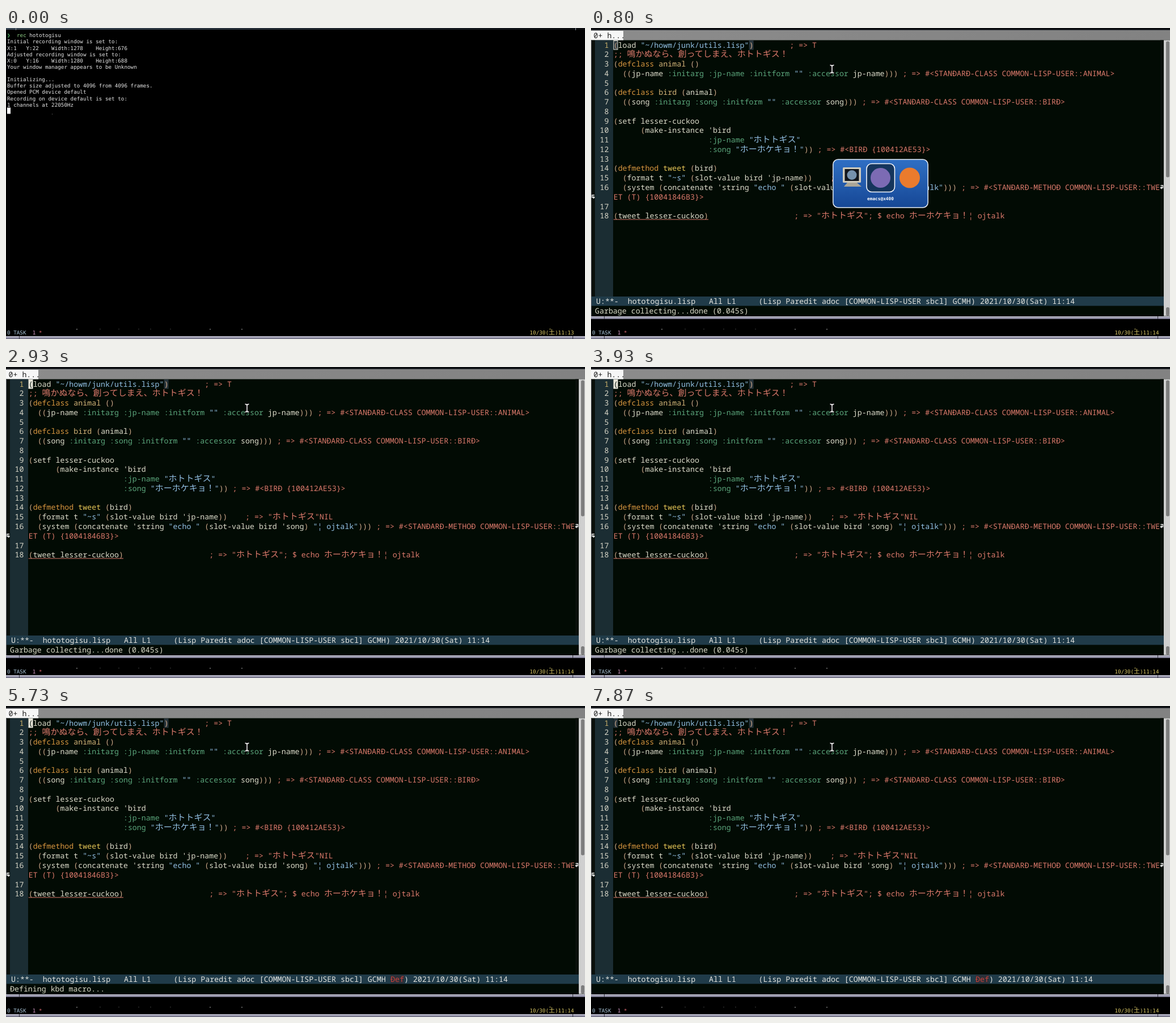
Write an HTML page that moves like this. It is 1021 by 549 pixels and loops after 8 s.

```html
<!DOCTYPE html>
<html lang="en">
<head>
<meta charset="utf-8">
<title>Lisp session</title>
<style>
  html, body { margin: 0; width: 100%; height: 100%; overflow: hidden; background: #000; }
  svg { display: block; width: 1021px; height: 549px; }
  text { white-space: pre; text-rendering: geometricPrecision; }
  .term { font: 9.277px "DejaVu Sans Mono", monospace; }
  .edit { font: 13.275px "Noto Sans Mono", monospace; }
  .term.wide { font: 11px "Noto Sans CJK JP", "Noto Sans CJK", sans-serif; }
  .edit.wide { font: 15px "Noto Sans CJK JP", "Noto Sans CJK", sans-serif; }
</style>
</head>
<body>
<svg id="stage" viewBox="0 0 1021 549">
  <defs>
    <linearGradient id="sky" x1="0" y1="0" x2="0" y2="1">
      <stop offset="0" stop-color="#2f6fc4"/>
      <stop offset="1" stop-color="#164795"/>
    </linearGradient>
    <linearGradient id="strip">
      <stop offset="0" stop-color="#3a4754"/>
      <stop offset="1" stop-color="#0c0e11"/>
    </linearGradient>
    <linearGradient id="bar">
      <stop offset="0" stop-color="#8c8c8c"/>
      <stop offset="1" stop-color="#828282"/>
    </linearGradient>
  </defs>
</svg>
<script>
const NS = 'http://www.w3.org/2000/svg';
const stage = document.getElementById('stage');
const LOOP = 8000;
const INK = '#dedccb', SALMON = '#dd7a6c', GREEN = '#5ba57b', STRING = '#93c0e4';
const ORANGE = '#d9963f', PAREN = '#cfa98a', BACK = '#020b04';
const FONTS = { term: { half: 5.585, full: 11 }, edit: { half: 7.965, full: 15 } };
const WIDE = /([\u3000-\u9fff\uff00-\uffef]+)/;

function add(tag, attrs, parent = stage) {
  const el = document.createElementNS(NS, tag);
  for (const key in attrs) el.setAttribute(key, attrs[key]);
  parent.append(el);
  return el;
}
const group = (parent = stage) => add('g', {}, parent);
const rect = (x, y, width, height, fill, parent, extra = {}) =>
  add('rect', { x, y, width, height, fill, ...extra }, parent);

// Draws one coloured run on the character grid and returns its right end.
function write(x, y, str, fill, font, parent) {
  const { half, full } = FONTS[font];
  for (const part of str.split(WIDE)) {
    const wide = WIDE.test(part);
    if (part.trim()) {
      const lead = part.length - part.trimStart().length;
      add('text', { x: x + lead * half, y, fill, class: font + (wide ? ' wide' : '') }, parent)
        .textContent = part.trim();
    }
    x += part.length * (wide ? full : half);
  }
  return x;
}

const TOKEN = /"[^"]*"|;.*$|:[a-z-]+|\bdef\w+|[()]+|\s+|[^\s()":;]+/g;
function colour(token, prev) {
  if (token[0] === '"') return STRING;
  if (token[0] === ';') return SALMON;
  if (token[0] === ':') return GREEN;
  if (/^def/.test(token)) return ORANGE;
  if (/^[()]/.test(token)) return PAREN;
  if (prev === 'defclass') return '#d2b277';
  if (prev === 'defmethod') return '#e6c657';
  return INK;
}
function highlight(x, y, line, parent) {
  let prev = '';
  for (const token of line.match(TOKEN) || []) {
    x = write(x, y, token, colour(token, prev), 'edit', parent);
    if (token.trim()) prev = token;
  }
}

function border(y, parent) {
  rect(0, y, 1021, 5, '#9a99ad', parent);
  rect(0, y, 1021, 1, '#d0cfde', parent);
  rect(0, y + 4, 1021, 1, '#56566a', parent);
  for (const x of [23, 999]) rect(x, y, 1, 5, '#33333d', parent);
}

// Terminal
rect(0, 0, 1021, 549, '#000');
rect(0, 0, 1021, 3, 'url(#strip)');
for (const x of [17, 1004]) rect(x, 0, 1, 4, '#8a939c');
const term = group();
const row = n => 16.3 + n * 11.13;
write(2, row(0), '❯', '#58c46a', 'term', term);
write(19, row(0), 'rec', '#8fce86', 'term', term);
write(41.2, row(0), 'hototogisu', '#e6e6e6', 'term', term);
[
  'Initial recording window is set to:',
  'X:1   Y:22    Width:1278    Height:676',
  'Adjusted recording window is set to:',
  'X:0   Y:16    Width:1280    Height:688',
  'Your window manager appears to be Unknown',
  '',
  'Initializing...',
  'Buffer size adjusted to 4096 from 4096 frames.',
  'Opened PCM device default',
  'Recording on device default is set to:',
  '1 channels at 22050Hz'
].forEach((line, i) => write(2, row(i + 1), line, '#e6e6e6', 'term', term));
const capturing = group(term);
write(2, row(12), 'Capturing!', '#e6e6e6', 'term', capturing);
const block = rect(2, 140.5, 6, 11, '#fff', term);
rect(81, 151, 1, 2, '#444', term);

// Terminal status line
for (const x of [125, 360, 416]) rect(x - 1, 531, 2, 1.5, '#777');
for (const x of [166, 199, 234, 255, 290]) rect(x - 1, 531, 2, 1, '#3a3a3a');
rect(958, 531, 3, 1, '#a89c50');
write(2, 541.3, '0 TASK', '#a9c5d8', 'term');
write(46.7, 541.3, '1', '#d59ac8', 'term');
write(57.9, 541.3, '*', '#e06c75', 'term');
const clocks = ['11:13', '11:14'].map(time => {
  const g = group();
  write(923.5, 541.3, `10/30(土)${time}`, '#d9c765', 'term', g);
  return g;
});
border(544);

// Editor window
const editor = group();
rect(0, 0, 1021, 514, BACK, editor);
rect(0, 0, 1021, 4, '#0a0c0f', editor);
rect(0, 3, 1021, 1, '#34383e', editor);
rect(0, 4, 1021, 17.5, 'url(#bar)', editor);
rect(0, 5, 57, 16.5, '#f6f6f6', editor);
write(4.5, 18, '0+ h...', '#222', 'edit', editor);
rect(0, 21.5, 7, 469, '#0a0f0b', editor);
rect(7, 21.5, 32, 452.5, '#1b2d33', editor);
rect(1004, 21.5, 6, 452.5, '#0a0f0b', editor);
rect(1010, 21.5, 11, 487, '#cfcfcf', editor);
rect(1014, 23.5, 6, 240, '#7d7d7d', editor, { rx: 2.5 });
rect(1014, 493, 6, 15, '#7d7d7d', editor, { rx: 2.5 });
rect(0, 21.5, 1, 488, '#66666f', editor);

const code = [
  '(load "~/howm/junk/utils.lisp")        ; => T',
  ';; 鳴かぬなら、創ってしまえ、ホトトギス！',
  '(defclass animal ()',
  '  ((jp-name :initarg :jp-name :initform "" :accessor jp-name))) ; => #<STANÐARÐ-CLASS COMMON-LISP-USER::ANIMAL>',
  '',
  '(defclass bird (animal)',
  '  ((song :initarg :song :initform "" :accessor song))) ; => #<STANÐARÐ-CLASS COMMON-LISP-USER::BIRÐ>',
  '',
  '(setf lesser-cuckoo',
  "      (make-instance 'bird",
  '                     :jp-name "ホトトギス"',
  '                     :song "ホーホケキョ！")) ; => #<BIRÐ {100412AE53}>',
  '',
  '(defmethod tweet (bird)',
  '  (format t "~s" (slot-value bird \'jp-name))    ; => "ホトトギス"NIL',
  '  (system (concatenate \'string "echo " (slot-value bird \'song) "¦ ojtalk"))) ; => #<STANÐARÐ-METHOÐ COMMON-LISP-USER::TWE',
  null,
  '',
  '(tweet lesser-cuckoo)                   ; => "ホトトギス"; $ echo ホーホケキョ！¦ ojtalk'
];
const lineY = i => 34.6 + i * 16.76;
const LEFT = 39.7;

for (const x of [39.5, 278.6]) rect(x, 22, 8, 16.5, '#26333a', editor);
let number = 0;
code.forEach((line, i) => {
  if (line === null) {
    write(LEFT, lineY(i), 'ET (T) {10041846B3}>', SALMON, 'edit', editor);
    return;
  }
  const label = String(++number).padStart(2);
  write(15.6, lineY(i), label, number === 1 ? '#c9b06a' : '#d9d7c8', 'edit', editor);
  highlight(LEFT, lineY(i), line, editor);
});
rect(LEFT, 337.5, 167.3, 1, SALMON, editor);

// Wrap marks in the fringes
const mark = (x, y, flip) => add('path', {
  d: 'M-2.5 -2.5H1.5V1.5H-2M-.5 -.5L-2.5 1.5L-.5 3.5', fill: 'none', stroke: '#eee',
  'stroke-width': 1.4, transform: `translate(${x} ${y}) scale(${flip} 1)`
}, editor);
mark(1007, 280.5, 1);
mark(3.5, 297.5, -1);

// Mode line and echo area
rect(1, 474, 1009, 16.5, '#203b49', editor);
const MODE_Y = 486.8;
const modeCol = n => 9 + n * FONTS.edit.half;
write(9, MODE_Y, 'U:**-  hototogisu.lisp   All L1     (Lisp Paredit adoc [COMMON-LISP-USER sbcl] GCMH',
  '#e2e4df', 'edit', editor);
const STAMP = ') 2021/10/30(Sat) 11:14';
const plainMode = group(editor), macroMode = group(editor);
write(modeCol(83), MODE_Y, STAMP, '#e2e4df', 'edit', plainMode);
rect(modeCol(84), 475, 24, 14.5, '#2b3038', macroMode);
write(modeCol(84), MODE_Y, 'Ðef', '#c8423c', 'edit', macroMode);
write(modeCol(87), MODE_Y, STAMP, '#e2e4df', 'edit', macroMode);
const [collected, defining] = ['Garbage collecting...done (0.045s)', 'Ðefining kbd macro...'].map(msg => {
  const g = group(editor);
  write(7, 503.6, msg, INK, 'edit', g);
  return g;
});
border(509, editor);

// Text cursor in its three looks, then the mouse pointer
const hollow = rect(40, 22.5, 7, 15.5, 'none', editor, { stroke: '#e8e6da' });
const solid = group(editor);
rect(39.5, 22, 8, 16.5, '#e8e6da', solid);
write(LEFT, lineY(0), '(', '#14201a', 'edit', solid);
const tail = rect(286.6, 22, 8, 16.5, '#e8e6da', editor);
const beam = 'M421.5 65.5Q425 65.5 425 68Q425 65.5 428.5 65.5M425 67V78M421.5 79.5Q425 79.5 425 77Q425 79.5 428.5 79.5';
for (const [stroke, width] of [['#000', 3.4], ['#fff', 1.5]])
  add('path', { d: beam, fill: 'none', stroke, 'stroke-width': width }, editor);

// Window switcher
const popup = group(editor);
rect(426.8, 232, 167.4, 85, 'url(#sky)', popup, { rx: 9, stroke: '#e9eef6', 'stroke-width': 1.5 });
rect(486, 239.5, 49.5, 50, '#15355c', popup, { rx: 9, stroke: '#f2f5fa', 'stroke-width': 1.6 });
rect(444, 246, 32, 27, '#cfcbbd', popup, { rx: 1.5 });
rect(447.5, 249, 25, 21, '#11151c', popup);
add('circle', { cx: 460, cy: 259.5, r: 8.5, fill: '#7591ad' }, popup);
add('path', { d: 'M452 273H469L477 280H446Z', fill: '#aaa698' }, popup);
add('circle', { cx: 510.5, cy: 264.5, r: 17.5, fill: '#7c6bb4' }, popup);
add('circle', { cx: 562, cy: 264.5, r: 18, fill: '#ea7b2d' }, popup);
add('text', {
  x: 510.5, y: 303.8, fill: '#fff', 'text-anchor': 'middle',
  style: 'font: bold 7.8px "DejaVu Sans Mono", monospace'
}, popup).textContent = 'emacs@x400';

// [start, cursor look]
const CURSOR = [
  [800, 'hollow'], [930, 'solid'], [1400, ''], [1870, 'solid'], [2400, ''], [2870, 'solid'],
  [3400, ''], [3870, 'solid'], [4340, ''], [4870, 'solid'], [5400, ''], [5730, 'solid'],
  [6200, ''], [6730, 'solid'], [7200, ''], [7330, 'tail'], [7870, '']
];
const show = (el, on) => el.setAttribute('visibility', on ? 'inherit' : 'hidden');

function draw(t) {
  const look = CURSOR.reduce((now, [start, name]) => t >= start ? name : now, '');
  const macro = t >= 5730;
  show(capturing, t >= 70);
  block.setAttribute('y', t < 70 ? 140.5 : 151.6);
  show(clocks[0], t < 400);
  show(clocks[1], t >= 400);
  show(editor, t >= 800);
  show(popup, t < 930);
  show(hollow, look === 'hollow');
  show(solid, look === 'solid');
  show(tail, look === 'tail');
  show(plainMode, !macro);
  show(macroMode, macro);
  show(collected, !macro);
  show(defining, macro && t < 7330);
}

const began = performance.now();
function tick() {
  draw((performance.now() - began) % LOOP);
  requestAnimationFrame(tick);
}
tick();
</script>
</body>
</html>
```
